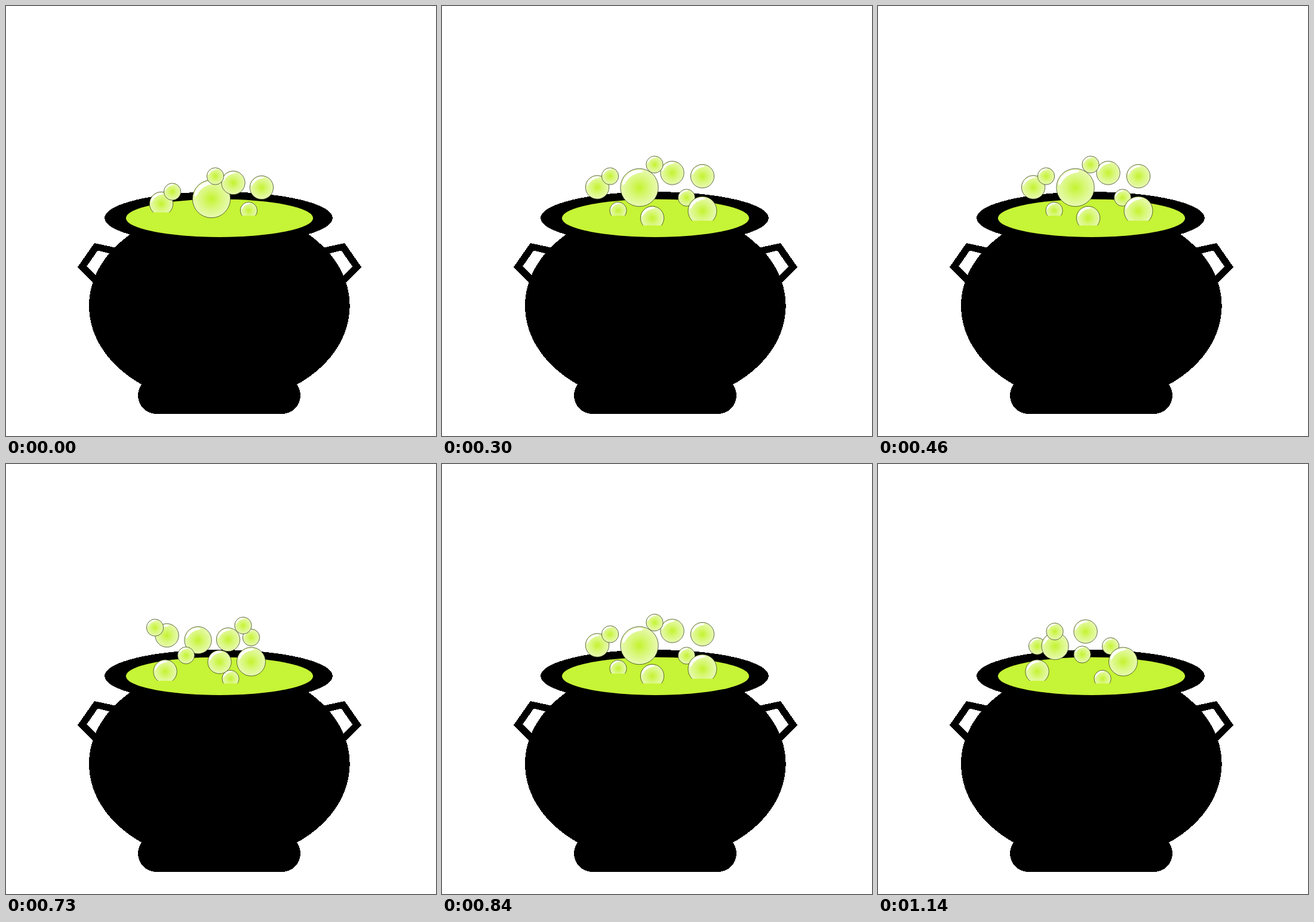
An HTML page without scripts that plays this animation: 720 by 720 pixels, repeating every 1.41 s.

```html
<!DOCTYPE html>
<html lang="en">
<head>
<meta charset="utf-8">
<title>Bubbling cauldron</title>
<style>
html, body { margin: 0; width: 100%; height: 100%; overflow: hidden; background: #fff; }
svg { display: block; width: 100vw; height: 100vh; }

.pot { shape-rendering: crispEdges; }
.pool { fill: #c6f436; }
.skin { fill: url(#glow); stroke: #222b08; stroke-width: .7; vector-effect: non-scaling-stroke; }
.sink { fill: none; stroke: #c6f436; stroke-width: 9; }

/* Each cluster pops in and out with hard cuts */
.pop { visibility: hidden; animation: 1410ms step-end infinite; }
.first { animation-name: first; }
.rise { animation-name: rise; }
.behind { animation-name: behind; }
.mid { animation-name: mid; }
.last { animation-name: last; }
.base { animation-name: base; }

@keyframes first {
  0% { visibility: visible; }
  21.276%, 100% { visibility: hidden; }
}
@keyframes rise {
  0%, 40.425%, 78.723%, 100% { visibility: hidden; }
  21.276%, 59.574% { visibility: visible; }
}
@keyframes behind {
  0%, 80.851%, 100% { visibility: hidden; }
  78.723% { visibility: visible; }
}
@keyframes mid {
  0%, 59.574%, 100% { visibility: hidden; }
  40.425% { visibility: visible; }
}
@keyframes last {
  0%, 100% { visibility: hidden; }
  78.723% { visibility: visible; }
}
@keyframes base {
  0%, 59.574%, 100% { visibility: hidden; }
  40.425%, 78.723% { visibility: visible; }
}
</style>
</head>
<body>
<svg viewBox="0 0 720 720">
  <defs>
    <radialGradient id="glow">
      <stop offset="0" stop-color="#c4f32f"/>
      <stop offset=".5" stop-color="#d8f778"/>
      <stop offset="1" stop-color="#e8fab4"/>
    </radialGradient>
    <linearGradient id="shine" x1="0" y1="0" x2="1" y2="1">
      <stop offset=".4" stop-color="#fff"/>
      <stop offset="1" stop-color="#fff" stop-opacity=".5"/>
    </linearGradient>
    <!-- bubble sizes: m 20, s 14.4, l 23, xl 24.4, xxl 32 -->
    <g id="m">
      <circle class="skin" r="19.7"/>
      <path d="M-18-4A18.4 18.4 0 0 1 3-18.2Q5-16 2-15.500Q-10-14-15-4Q-17-1-18-4Z" fill="url(#shine)"/>
    </g>
    <use id="s" href="#m" transform="scale(.72)"/>
    <use id="l" href="#m" transform="scale(1.15)"/>
    <use id="xl" href="#m" transform="scale(1.22)"/>
    <use id="xxl" href="#m" transform="scale(1.61)"/>
    <path id="handle" fill-rule="evenodd" d="M190 406L148 397 120 437 148 466H190ZM184 417L153.500 409.500 135 436 152 453H184Z"/>
    <g id="cluster">
      <use href="#m" x="260" y="303.500"/>
      <use href="#s" x="281.500" y="285"/>
      <use href="#xxl" x="330.500" y="304"/>
      <use href="#m" x="385.500" y="279.500"/>
      <use href="#s" x="356" y="265.500"/>
      <use href="#m" x="436" y="285"/>
      <use href="#s" x="409.500" y="321"/>
      <use href="#s" x="295" y="342.500"/>
      <use href="#m" x="352" y="355"/>
      <use href="#xl" x="436" y="343"/>
      <path class="sink" d="M278 355.500h34M330 372h44M409 364h54"/>
    </g>
  </defs>

  <g class="pop behind"><use href="#cluster"/></g>

  <g class="pot">
    <use href="#handle"/>
    <use href="#handle" transform="translate(715 0) scale(-1 1)"/>
    <ellipse cx="357.300" cy="502" rx="218.300" ry="164"/>
    <rect x="221" y="621" width="272" height="62" rx="31"/>
    <ellipse cx="356" cy="355" rx="191" ry="44"/>
  </g>
  <ellipse class="pool" cx="357.500" cy="355.200" rx="156.700" ry="31.700"/>

  <g class="pop first">
    <use href="#m" x="260" y="331"/>
    <use href="#s" x="406.500" y="342.500"/>
    <path class="sink" d="M238 350h44M390 355.500h33"/>
    <use href="#s" x="278.500" y="311"/>
    <use href="#xxl" x="344" y="323"/>
    <use href="#m" x="380.500" y="296"/>
    <use href="#s" x="350.500" y="285"/>
    <use href="#m" x="428" y="304"/>
  </g>

  <g class="pop rise"><use href="#cluster"/></g>

  <g class="pop mid">
    <use href="#m" x="269.500" y="287"/>
    <use href="#s" x="249.500" y="274"/>
    <use href="#l" x="321.500" y="295"/>
    <use href="#s" x="301.500" y="320.500"/>
    <use href="#m" x="372" y="294"/>
    <use href="#s" x="410.500" y="290.500"/>
    <use href="#s" x="397" y="270.500"/>
    <use href="#m" x="357.500" y="331.500"/>
  </g>

  <g class="pop last">
    <use href="#s" x="266.500" y="305"/>
    <use href="#l" x="296.500" y="305"/>
    <use href="#s" x="296" y="280.500"/>
    <use href="#m" x="347.500" y="280.500"/>
    <use href="#s" x="342" y="319"/>
    <use href="#s" x="389.500" y="305"/>
  </g>

  <g class="pop base">
    <use href="#m" x="266.500" y="347.500"/>
    <use href="#s" x="376" y="359.500"/>
    <path class="sink" d="M244 367.500h45M359 372h34"/>
    <use href="#xl" x="410.500" y="331"/>
  </g>
</svg>
</body>
</html>
```
